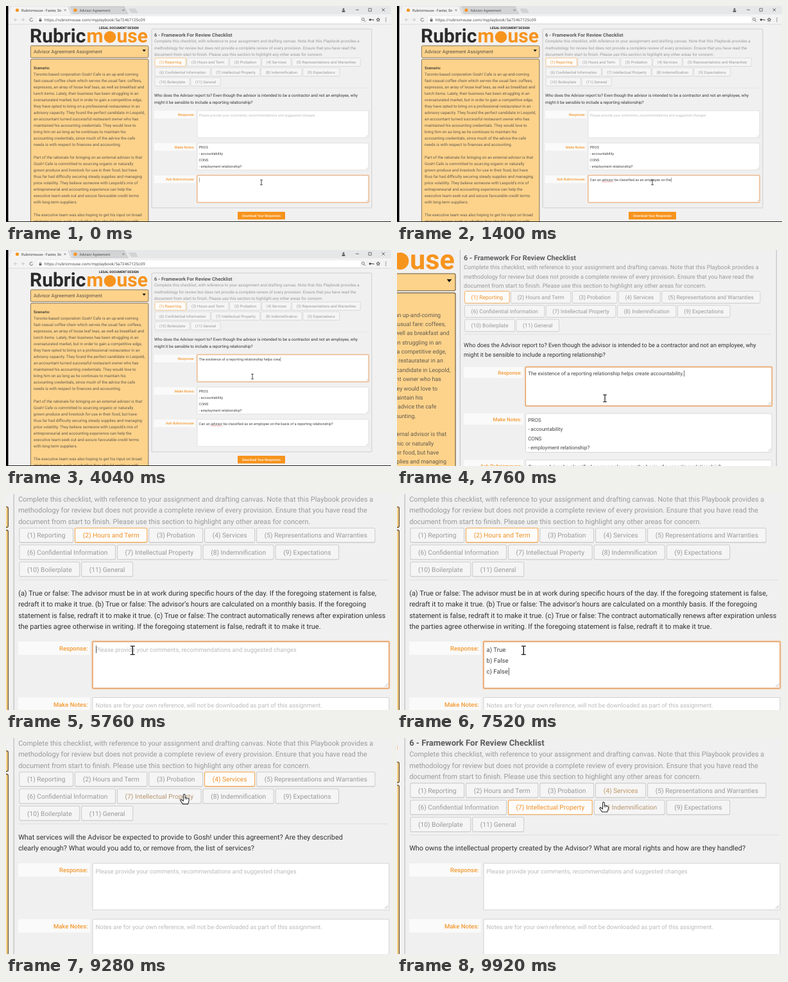
Write an HTML page with a canvas that moves like this. It is 600 px wide and 338 px high and loops after 9960 ms.

```html
<!DOCTYPE html>
<html lang="en">
<head>
<meta charset="utf-8">
<title>Review checklist</title>
<style>
html, body { margin: 0; width: 100%; height: 100%; overflow: hidden; background: #f2f1f1; }
canvas { display: block; width: 600px; height: 338px; }
</style>
</head>
<body>
<canvas id="stage"></canvas>
<script>
const LOOP = 9960, LINE = 10.1;
const ORANGE = '#f7941e', GREY = '#999', INK = '#333';
const canvas = document.getElementById('stage');
const c = canvas.getContext('2d');
const dpr = window.devicePixelRatio || 1;
canvas.width = 600 * dpr;
canvas.height = 338 * dpr;
c.textRendering = 'geometricPrecision';

const story = `Toronto-based corporation Gosh! Cafe is an up-and-coming
fast-casual coffee chain which serves the usual fare: coffees,
espressos, an array of loose leaf teas, as well as breakfast and
lunch items. Lately, their business has been struggling in an
oversaturated market, but in order to gain a competitive edge,
they have opted to bring on a professional restaurateur in an
advisory capacity. They found the perfect candidate in Leopold,
an accountant turned successful restaurant owner who has
maintained his accounting credentials. They would love to
bring him on as long as he continues to maintain his
accounting credentials, since much of the advice the cafe
needs is with respect to finances and accounting.

Part of the rationale for bringing on an external advisor is that
Gosh! Cafe is committed to sourcing organic or naturally
grown produce and livestock for use in their food, but have
thus far had difficulty securing steady supplies and managing
price volatility. They believe someone with Leopold's mix of
entrepreneurial and accounting experience can help the
executive team seek out and secure favourable credit terms
with long-term suppliers.

The executive team was also hoping to get his input on broad
strategic issues, such as whether they should continue with`;

const intro = `Complete this checklist, with reference to your assignment and drafting canvas. Note that this Playbook provides a
methodology for review but does not provide a complete review of every provision. Ensure that you have read the
document from start to finish. Please use this section to highlight any other areas for concern.`;

const questions = [
`Who does the Advisor report to? Even though the advisor is intended to be a contractor and not an employee, why
might it be sensible to include a reporting relationship?`,
`(a) True or false: The advisor must be in at work during specific hours of the day. If the foregoing statement is false,
redraft it to make it true. (b) True or false: The advisor’s hours are calculated on a monthly basis. If the foregoing
statement is false, redraft it to make it true. (c) True or false: The contract automatically renews after expiration unless
the parties agree otherwise in writing. If the foregoing statement is false, redraft it to make it true.`,
`Is there a probation period? What are some reasons it might be beneficial for Gosh! to include one? Read the
termination clause. Given what it says, is a probation period necessary in this agreement? Justify your answer.`,
`What services will the Advisor be expected to provide to Gosh! under this agreement? Are they described
clearly enough? What would you add to, or remove from, the list of services?`, , ,
`Who owns the intellectual property created by the Advisor? What are moral rights and how are they handled?`];

const askText = 'Can an advisor be classified as an employee on the basis of a reporting relationship?';
const replyText = 'The existence of a reporting relationship helps create accountability.';
const hoursText = 'a) True\nb) False\nc) False';
const replyHint = 'Please provide your comments, recommendations and suggested changes';
const notesHint = 'Notes are for your own reference, will not be downloaded as part of this assignment.';

// Key points: time, then values
const askKeys = [[0, 0], [960, 35], [2040, 72], [2240, 78], [2360, 85]];
const replyKeys = [[3000, 0], [4040, 52], [4400, 70]];
const hoursKeys = [[5960, 0], [6440, 7], [6540, 7], [7520, 25]];
const mouseKeys = [[2520, 398, 276], [2840, 384, 198], [5020, 384, 198], [5250, 315, 88.5],
  [5310, 315, 88.5], [5600, 334, 192], [7640, 334, 192], [7980, 371, 88], [8080, 371, 88],
  [8380, 414.7, 86.4], [8860, 414.7, 86.4], [9540, 364, 108.5], [9740, 364, 108.5], [9890, 406, 108.5]];

const smooth = u => { u = Math.min(1, Math.max(0, u)); return u * u * (3 - 2 * u); };

function follow(keys, t, ease = u => u) {
  if (t <= keys[0][0]) return keys[0].slice(1);
  for (let i = 1; i < keys.length; i++) {
    const a = keys[i - 1], b = keys[i];
    if (t <= b[0]) {
      const u = ease((t - a[0]) / (b[0] - a[0]));
      return a.slice(1).map((v, j) => v + (b[j + 1] - v) * u);
    }
  }
  return keys[keys.length - 1].slice(1);
}

const typed = (text, keys, t) => text.slice(0, Math.floor(follow(keys, t)[0] + 0.001));
const mouseAt = t => follow(mouseKeys, t, smooth);
const pageAt = t => t < 5300 ? 0 : t < 8040 ? 1 : t < 8720 ? 2 : t < 9710 ? 3 : 6;
const scrollAt = t => pageAt(t) === 6 ? LINE : 0;
const focusAt = t => t < 2860 ? 'ask' : t < 5300 ? 'reply' : t >= 5650 && t < 8040 ? 'reply' : '';

function font(size, weight = 400) {
  c.font = `${weight} ${size}px Roboto, Arial, sans-serif`;
}

// y is the middle of the capitals
function text(str, x, y, size, color, weight, align = 'left') {
  font(size, weight);
  c.fillStyle = color;
  c.textAlign = align;
  c.fillText(str, x, y + size * 0.355);
}

function lines(str, x, y, size, color, step = LINE) {
  str.split('\n').forEach((s, i) => text(s, x, y + i * step, size, color));
}

function rect(x, y, w, h, fill) {
  c.fillStyle = fill;
  c.fillRect(x, y, w, h);
}

function box(x, y, w, h, r, fill, stroke, width = 0.7) {
  c.beginPath();
  c.roundRect(x, y, w, h, r);
  if (fill) { c.fillStyle = fill; c.fill(); }
  if (stroke) { c.strokeStyle = stroke; c.lineWidth = width; c.stroke(); }
}

function shape(pts, fill) {
  c.beginPath();
  pts.forEach(([x, y]) => c.lineTo(x, y));
  c.closePath();
  c.fillStyle = fill;
  c.fill();
}

function path(pts, color, width = 0.8) {
  c.beginPath();
  pts.forEach(([x, y]) => c.lineTo(x, y));
  c.strokeStyle = color;
  c.lineWidth = width;
  c.stroke();
}

function dot(x, y, r, fill) {
  c.beginPath();
  c.arc(x, y, r, 0, 7);
  c.fillStyle = fill;
  c.fill();
}

function layoutTabs() {
  const rows = [
    ['Reporting', 'Hours and Term', 'Probation', 'Services', 'Representations and Warranties'],
    ['Confidential Information', 'Intellectual Property', 'Indemnification', 'Expectations'],
    ['Boilerplate', 'General']];
  const out = [];
  font(5.92);
  rows.forEach((row, r) => {
    let x = 232;
    row.forEach(name => {
      const label = `(${out.length + 1}) ${name}`;
      const w = c.measureText(label).width + 14;
      out.push({ label, x, y: 81.3 + r * 15.4, w, h: 13 });
      x += w + 1.7;
    });
  });
  return out;
}
let tabs = layoutTabs();

function hovered(tab, t) {
  const [x, y] = mouseAt(t), top = tab.y + scrollAt(t);
  return x > tab.x && x < tab.x + tab.w && y > top && y < top + tab.h;
}

// Share of the last moments in which a tab was lit, for its colour fade
function warmth(i, t) {
  let n = 0;
  for (let k = 0; k < 10; k++) {
    const past = Math.max(0, t - k * 36);
    if (pageAt(past) === i || hovered(tabs[i], past)) n++;
  }
  return n / 10;
}

function drawTab(tab, i, t) {
  const active = pageAt(t) === i;
  const warm = active ? 1 : Math.min(1, warmth(i, t) * 1.15);
  const lit = active || warm > 0.6 && hovered(tab, t);
  const mix = (a, b) => Math.round(a + (b - a) * warm);
  rect(tab.x + 0.3, tab.y + tab.h, tab.w - 0.6, 0.6, 'rgba(0,0,0,.1)');
  box(tab.x, tab.y, tab.w, tab.h, 1.2, active ? '#fdfcfb' : '#f5f5f5', lit ? '#f5a54a' : '#cdcdcd', 0.6);
  text(tab.label, tab.x + 7, tab.y + 6.7, 5.92, `rgb(${mix(153, 240)},${mix(153, 145)},${mix(153, 40)})`);
}

function drawField(label, y, value, hint, focused) {
  rect(231, y, 64.5, 12, '#fafafa');
  text(label, 293.7, y + 6.4, 5.5, '#f39a32', 500, 'right');
  if (focused) box(297.4, y - 0.6, 268.2, 43.4, 1.2, null, 'rgba(245,150,60,.25)', 1.2);
  box(298, y, 267, 42.2, 0.8, '#fff', focused ? '#e39a5c' : '#d2d2d2', focused ? 0.8 : 0.6);
  path([[561, y + 41], [564, y + 38]], '#999', 0.4);
  path([[562.6, y + 41], [564, y + 39.6]], '#999', 0.4);
  const rows = value.split('\n');
  if (value) lines(value, 300.6, y + 7, 5.58, '#444', 10);
  else if (hint) text(hint, 300.6, y + 7.2, 5.48, '#bbb');
  if (focused) {
    const last = rows.length - 1;
    font(5.58);
    rect(301 + c.measureText(rows[last]).width, y + 3.6 + last * 10, 0.5, 6.8, '#444');
  }
}

function drawBrowser() {
  rect(0, 0, 600, 13, '#e6e7e8');
  shape([[100, 1], [184, 1], [190, 13], [104, 13]], '#d2d3d5');
  shape([[191, 4], [202, 4], [206, 11], [195, 11]], '#d2d3d5');
  path([[100, 1], [184, 1], [190, 13]], '#aaa', 0.5);
  shape([[4, 13], [9, 1], [97, 1], [102, 13]], '#f3f3f3');
  path([[97, 1], [102, 13]], '#aaa', 0.5);
  dot(17.5, 6.5, 2.6, ORANGE);
  dot(108, 6.5, 2.6, ORANGE);
  text('Rubricmouse - Faster, Sn', 24, 6.5, 5.7, '#444');
  text('Advisor Agreement', 114.5, 6.5, 5.64, '#555');
  rect(0, 13, 600, 15.5, '#f3f3f3');
  box(48, 15.5, 505, 11.5, 1, '#fff', '#dcdcdc', 0.5);
  text('https://rubricmouse.com/myplaybook/5a72467125c09', 60, 21.5, 6.4, '#555');
  rect(0, 28, 600, 0.6, '#d0d0d0');
  const cross = (x, y, r, col) => {
    path([[x - r, y - r], [x + r, y + r]], col);
    path([[x + r, y - r], [x - r, y + r]], col);
  };
  cross(92, 6.5, 1.5, '#777');
  cross(183, 6.5, 1.5, '#777');
  cross(588, 6, 2.3, '#444');
  path([[545, 6], [550, 6]], '#444');
  box(565, 3.8, 4.4, 4.4, 0, null, '#444');
  dot(526, 5, 1.5, '#555');
  box(523.5, 7, 5, 2.4, 1, '#555');
  // Toolbar icons
  path([[15, 19], [12.5, 21.5], [15, 24]], '#bbb');
  path([[12.5, 21.5], [17.5, 21.5]], '#bbb');
  path([[26, 19], [28.5, 21.5], [26, 24]], '#bbb');
  path([[23.5, 21.5], [28.5, 21.5]], '#bbb');
  c.beginPath();
  c.arc(39.5, 21.5, 2.5, 0.3, 5.6);
  c.strokeStyle = '#555';
  c.stroke();
  box(51.5, 21, 4, 3.2, 0.3, '#666');
  box(52.3, 18.8, 2.4, 3, 1.2, null, '#666');
  box(554.5, 18.7, 4, 4, 2, null, '#555');
  path([[558, 22.5], [560, 24.5]], '#555', 1);
  dot(567.5, 21.5, 1.8, '#555');
  path([[568, 21.5], [573, 21.5], [573, 23]], '#555', 1);
  c.beginPath();
  for (let i = 0; i < 10; i++) {
    const a = i * Math.PI / 5 - Math.PI / 2, r = i % 2 ? 1.3 : 3;
    c.lineTo(580 + r * Math.cos(a), 21.5 + r * Math.sin(a));
  }
  c.closePath();
  c.stroke();
  [19, 21.5, 24].forEach(y => dot(592, y, 0.7, '#555'));
}

function drawScenario() {
  text('Rubric', 37, 46.8, 30, '#2b2b2b', 700);
  text('m', 125.5, 46.8, 30, ORANGE, 700);
  dot(162, 48.5, 9.3, ORANGE);
  text('use', 172.5, 46.8, 30, ORANGE, 700);
  text('LEGAL DOCUMENT DESIGN', 145, 34.5, 5, '#222', 700);
  box(38.4, 62.2, 183.5, 18.6, 1.5, '#fdd38b', '#6b5637', 0.8);
  text('Advisor Agreement Assignment', 43, 71.2, 7.6, '#5a5347');
  shape([[212.5, 68.3], [218, 68.3], [215.2, 71.6]], '#111');
  box(38.4, 83.2, 183.5, 300, 1.5, '#fdd38b', '#6b5637', 0.8);
  text('Scenario:', 43, 97, 6, '#4c463c', 700);
  lines(story, 43, 107, 6.22, '#625b4e', 10);
}

function drawChecklist(t) {
  const page = pageAt(t), question = questions[page], focus = focusAt(t);
  const top = 163.9 + (question.split('\n').length - 2) * LINE;
  box(227, 36, 343, top + 116, 1.5, '#f0f0f0', '#bdbdbd', 0.7);
  text('6 - Framework For Review Checklist', 231, 45, 7.56, '#5c5c5c', 700);
  lines(intro, 231, 55.2, 6.32, GREY);
  tabs.forEach((tab, i) => drawTab(tab, i, t));
  rect(231, 128, 333, 0.5, '#dcdcdc');
  lines(question, 231, 140.2, 6.33, INK);

  const reply = page === 0 ? typed(replyText, replyKeys, t) : page === 1 ? typed(hoursText, hoursKeys, t) : '';
  const notes = page === 0 ? 'PROS\n- accountability\nCONS\n- employment relationship?' : '';
  const ask = page === 0 ? typed(askText, askKeys, t) : '';
  drawField('Response:', top, reply, replyHint, focus === 'reply');
  drawField('Make Notes:', top + 50.6, notes, notesHint, false);
  drawField('Ask Rubricmouse:', top + 101.2, ask, '', focus === 'ask');
  if (ask.length > 14) {
    font(5.58);
    const x = 300.6 + c.measureText('Can an ').width, w = c.measureText('advisor').width;
    c.setLineDash([0.9, 0.5]);
    path([[x, top + 111.2], [x + w, top + 111.2]], '#e23b2e', 0.7);
    c.setLineDash([]);
  }
  box(361, top + 158.2, 74, 12, 1, ORANGE);
  text('Download Your Responses', 398, top + 164.2, 5, '#fff', 500, 'center');
}

function drawMouse(t) {
  const [x, y] = mouseAt(t);
  c.save();
  c.translate(x, y);
  if (tabs.some(tab => hovered(tab, t))) {
    const hand = [[-0.8, 0.6], [0, 0], [0.8, 0.6], [0.8, 3.2], [3.6, 3.8], [4.4, 4.8], [4.2, 6.6],
      [3.3, 9], [-1.2, 9], [-3.5, 5.8], [-2.9, 4.8], [-0.8, 6.2]];
    shape(hand, '#fff');
    path([...hand, hand[0]], '#222', 0.6);
    path([[0.8, 3.2], [0.8, 5]], '#222', 0.4);
    path([[2.2, 3.6], [2.2, 5]], '#222', 0.4);
  } else {
    path([[0, -3.8], [0, 3.8]], '#111', 0.8);
    [-3.8, 3.8].forEach(v => path([[-2, v], [2, v]], '#111', 0.7));
  }
  c.restore();
}

function draw(t) {
  const k = smooth((t - 4240) / 920), s = 1 + 0.73 * k;
  c.setTransform(dpr, 0, 0, dpr, 0, 0);
  rect(0, 0, 600, 338, '#f2f1f1');
  c.translate(-380.5 * k, -87.5 * k);
  c.scale(s, s);
  c.save();
  c.translate(0, scrollAt(t));
  drawScenario();
  drawChecklist(t);
  c.restore();
  drawBrowser();
  rect(0, 0, 3.5, 338, '#000');
  rect(0, 337, 600, 1, '#222');
  drawMouse(t);
}

const start = performance.now();
function tick() {
  tabs = layoutTabs();
  draw((performance.now() - start) % LOOP);
  requestAnimationFrame(tick);
}
tick();
</script>
</body>
</html>
```
